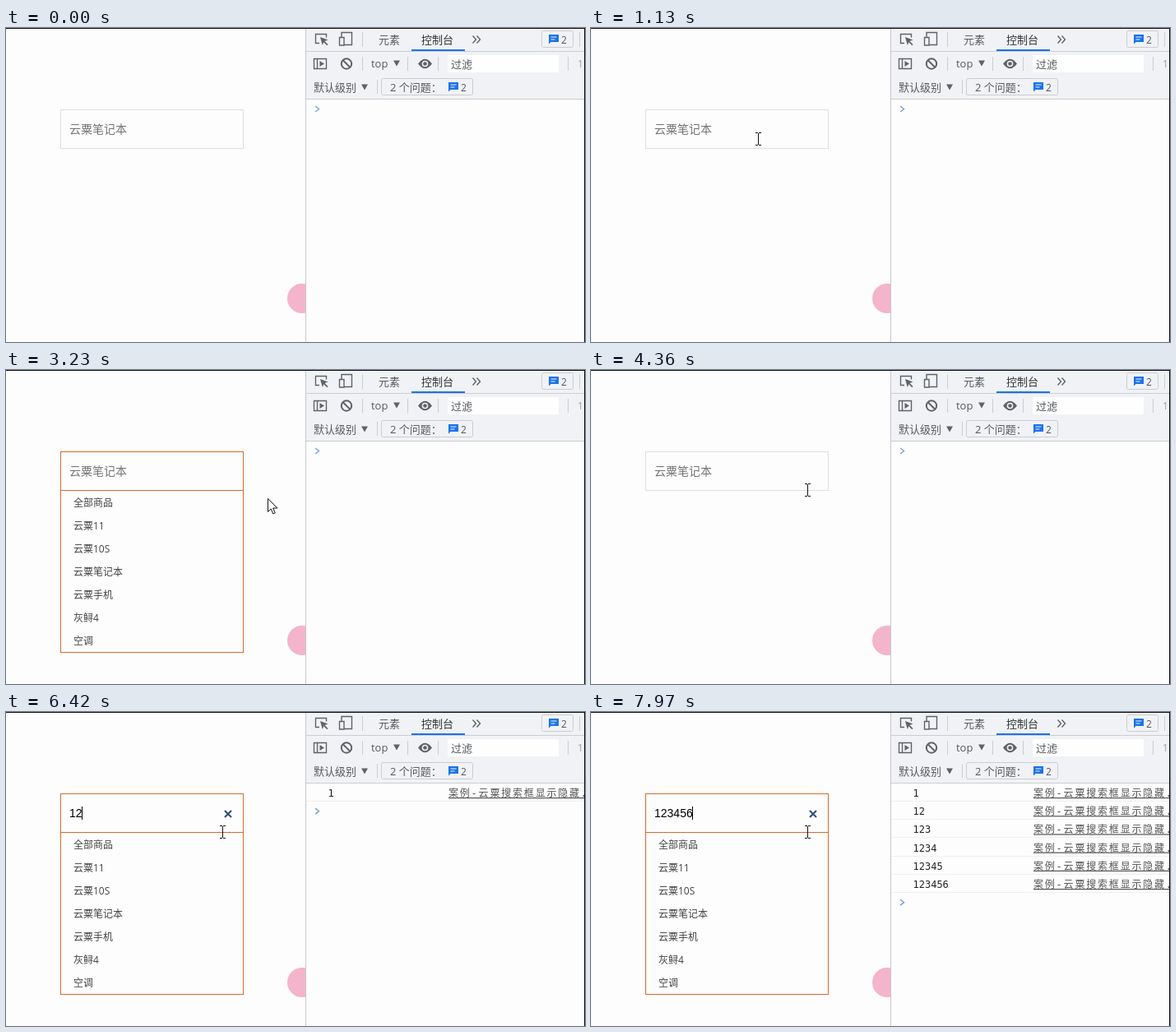
Write an HTML page that moves like this. It is 704x382 px and loops after 8 s.

```html
<!DOCTYPE html>
<html lang="zh">
<head>
<meta charset="utf-8">
<title>搜索框</title>
<style>
  html, body { margin: 0; width: 100%; height: 100%; overflow: hidden; background: #fdfdfd; }
  svg { display: block; width: 100vw; height: 100vh; }
  text { font: 13px "Open Sans", "Noto Sans CJK SC", "Noto Sans CJK", sans-serif; fill: #55585c; white-space: pre; }
  .hint { font-size: 14px; fill: #757575; }
  .typed { font: 14px "Liberation Sans", Arial, sans-serif; fill: #000; }
  .item { font-size: 12px; fill: #424242; }
  .log { font: 12px "DejaVu Sans Mono", monospace; fill: #242424; }
  .link { font: 12px "DejaVu Sans Mono", "Noto Sans CJK SC", monospace; letter-spacing: 1.8px; fill: #545454; text-decoration: underline; }
  .crisp { shape-rendering: crispEdges; }
  .line { fill: none; stroke: #5f6368; stroke-width: 1.4; }
  .solid { fill: #5f6368; }
  .rule { fill: none; stroke: #cacdd1; }
  .prompt { fill: none; stroke: #7fa3d6; stroke-width: 1.5; }
</style>
</head>
<body>
<svg viewBox="0 0 704 382" preserveAspectRatio="none">
  <defs>
    <g id="issue">
      <path d="M0 0h12v9h-9.500l-2.500 2.500z" fill="#1a73e8"/>
      <path d="M2.500 3h7M2.500 6h5" stroke="#f1f3f4" stroke-width="1.200"/>
    </g>
    <path id="down" class="solid" d="M0 0h8l-4 7z"/>
  </defs>

  <rect width="704" height="382" fill="#fdfdfd"/>
  <circle cx="360" cy="329" r="18" fill="#f4b4cc"/>

  <g class="crisp">
    <rect x="66.500" y="99.500" width="222" height="47" fill="#fdfdfd" stroke="#e0e0e0"/>
    <path id="focusRing" d="M66.500 99.500h222v47h-222z" fill="none" stroke="#d46c2c"/>
  </g>
  <g id="list">
    <path class="crisp" d="M66.500 147v196.500h222v-196.500" fill="#fdfdfd" stroke="#d46c2c"/>
  </g>
  <text id="hint" class="hint" x="77" y="128">云粟笔记本</text>
  <text id="typed" class="typed" x="77" y="128"></text>
  <path id="clear" d="M266 120l8 8m0-8l-8 8" stroke="#34507c" stroke-width="2.200"/>
  <rect id="caret" class="crisp" y="115" width="1" height="16" fill="#000"/>

  <rect x="364" width="340" height="382" fill="#fdfdfd"/>
  <rect x="364" width="340" height="86" fill="#f1f2f5"/>
  <g class="crisp">
    <path class="rule" d="M364 28.500h340M364 86.500h340M433.500 5v18M697.500 5v18M433.500 35v17M488.500 35v17M525.500 35v17M683.500 35v17M451.500 63v17"/>
    <path d="M364.500 0v382" stroke="#c6c8cc"/>
    <rect x="493" y="26" width="65" height="2" fill="#1a73e8"/>
    <rect x="537" y="33" width="135" height="21" fill="#fefefe"/>
  </g>
  <rect class="rule" x="651.500" y="3.500" width="38" height="20" rx="2"/>
  <rect class="rule" x="456.500" y="61.500" width="111" height="20" rx="2"/>

  <path class="line" d="M381 18.500h-4.500v-11h13v4"/>
  <path class="solid" d="M382 11l9.500 3.500-4 1.500 4 4-1.200 1.200-4-4-1.500 3.800z"/>
  <path class="line" d="M408 11v-5.500h12.500v4M405.500 11.500h5.500v9.500h-5.500zM411 20.500h9.500v-11"/>
  <path class="line" d="M567.500 9.500l4 4.500-4 4.500M572.500 9.500l4 4.500-4 4.500"/>
  <path class="line" d="M374.500 37.500h15v12h-15zM378.500 37.500v12"/>
  <path class="solid" d="M381.500 40l5.500 3.500-5.500 3.500z"/>
  <path class="line" d="M409.500 39l9 9" style="stroke-width:2"/>
  <circle class="line" cx="414" cy="43.500" r="6.200" style="stroke-width:2"/>
  <path class="solid" d="M501 43.500q8.500-11.500 17 0q-8.500 11.500-17 0z"/>
  <circle cx="509.500" cy="43.500" r="3.800" fill="#f1f2f5"/>
  <circle class="solid" cx="509.500" cy="43.500" r="2.300"/>
  <use href="#down" x="471" y="39.500"/>
  <use href="#down" x="432" y="68.500"/>
  <use href="#issue" x="660" y="8"/>
  <use href="#issue" x="538" y="66"/>

  <text x="453" y="18.500">元素</text>
  <text x="505" y="18.500" style="fill:#303134">控制台</text>
  <text x="675" y="18.500" style="font-size:12px">2</text>
  <text x="444" y="48">top</text>
  <text x="541" y="48.500">过滤</text>
  <text x="695" y="48" style="font-size:12px;fill:#9a9da1">1</text>
  <text x="374" y="76.500">默认级别</text>
  <text x="467" y="76.500">2 个问题：</text>
  <text x="553" y="76.500" style="font-size:12px">2</text>

  <g id="logs"></g>
  <path id="prompt" class="prompt" d="M376 95l4.500 3.500-4.500 3.500"/>

  <path class="crisp" d="M0 .5h703.500v382" fill="none" stroke="#111"/>

  <path id="arrow" d="M.5.5v16l3.700-3.500 2.600 6 2.500-1.100-2.600-5.900h5.200z" fill="#fff" stroke="#111"/>
  <path id="beam" class="crisp" d="M-3.500-7.500h3m1 0h3M0-7v14M-3.500 7.500h3m1 0h3" stroke="#111" fill="none"/>
</svg>

<script>
const LOOP = 8000, BLINK = 530, FADE = 260, ROW = 22.2;
const ITEMS = ['全部商品', '云粟11', '云粟10S', '云粟笔记本', '云粟手机', '灰鲟4', '空调'];
const FOCUS = [[1450, 3280], [4450, LOOP + FADE]];
const KEYS = [6000, 6400, 6800, 7170, 7450, 7790];
const LOGS = [6100, 6500, 6890, 7270, 7540, 7890];
// time, x, y of the pointer's hot spot
const PATH = [
  [50, 160, 381], [400, 205, 240], [650, 223, 182], [720, 223, 182], [840, 219, 150],
  [1010, 200, 137], [1130, 203, 135], [2340, 203, 135], [2700, 262, 144],
  [3140, 318, 156], [4080, 318, 156], [4330, 263, 146], [LOOP, 263, 146]
];

const $ = id => document.getElementById(id);
const clamp = v => Math.min(1, Math.max(0, v));
const smooth = v => v * v * (3 - 2 * v);
const show = (el, on) => el.setAttribute('visibility', on ? 'visible' : 'hidden');
const move = (el, x, y) => el.setAttribute('transform', `translate(${x} ${y})`);

function add(parent, tag, attrs, content = '') {
  const el = document.createElementNS('http://www.w3.org/2000/svg', tag);
  for (const name in attrs) el.setAttribute(name, attrs[name]);
  el.textContent = content;
  return parent.appendChild(el);
}

ITEMS.forEach((name, i) => add($('list'), 'text', { class: 'item', x: 82, y: 165.5 + 28 * i }, name));

const rows = LOGS.map((_, i) => {
  const row = add($('logs'), 'g', {});
  const y = 103 + ROW * i;
  add(row, 'text', { class: 'log', x: 391.5, y }, '123456'.slice(0, i + 1));
  add(row, 'text', { class: 'link', x: 538, y }, '案例-云粟搜索框显示隐藏.html');
  add(row, 'path', { class: 'crisp', d: `M365 ${Math.round(y + 5) + .5}h338`, stroke: '#f0f0f2' });
  return row;
});

function pointer(t) {
  const i = PATH.findIndex(p => p[0] > t);
  if (i < 1) return null;
  const [t0, x0, y0] = PATH[i - 1], [t1, x1, y1] = PATH[i];
  const k = smooth((t - t0) / (t1 - t0));
  return [Math.round(x0 + (x1 - x0) * k), Math.round(y0 + (y1 - y0) * k)];
}

function render(t) {
  const count = KEYS.filter(k => t >= k).length;
  const logged = LOGS.filter(k => t >= k).length;

  const level = Math.max(...FOCUS.map(([a, b]) =>
    smooth(clamp((t - a) / FADE)) * (1 - smooth(clamp((t - b) / FADE)))));
  $('focusRing').setAttribute('opacity', level);
  $('list').setAttribute('opacity', level);

  $('typed').textContent = '123456'.slice(0, count);
  show($('hint'), !count);
  show($('clear'), count);

  const session = FOCUS.find(([a, b]) => t >= a && t < b);
  const since = session && t - (count ? KEYS[count - 1] : session[0]);
  show($('caret'), session && since % (2 * BLINK) < BLINK);
  $('caret').setAttribute('x', Math.round(76.5 + 7.75 * count));

  rows.forEach((row, i) => show(row, i < logged));
  move($('prompt'), 0, ROW * logged);

  const at = pointer(t);
  const inField = at && at[0] > 66 && at[0] < 289 && at[1] > 99 && at[1] < 149;
  show($('arrow'), at && !inField);
  show($('beam'), inField);
  if (at) {
    move($('arrow'), ...at);
    move($('beam'), at[0] + .5, at[1]);
  }
}

const start = performance.now();
function tick() {
  render((performance.now() - start) % LOOP);
  requestAnimationFrame(tick);
}
tick();
</script>
</body>
</html>
```
